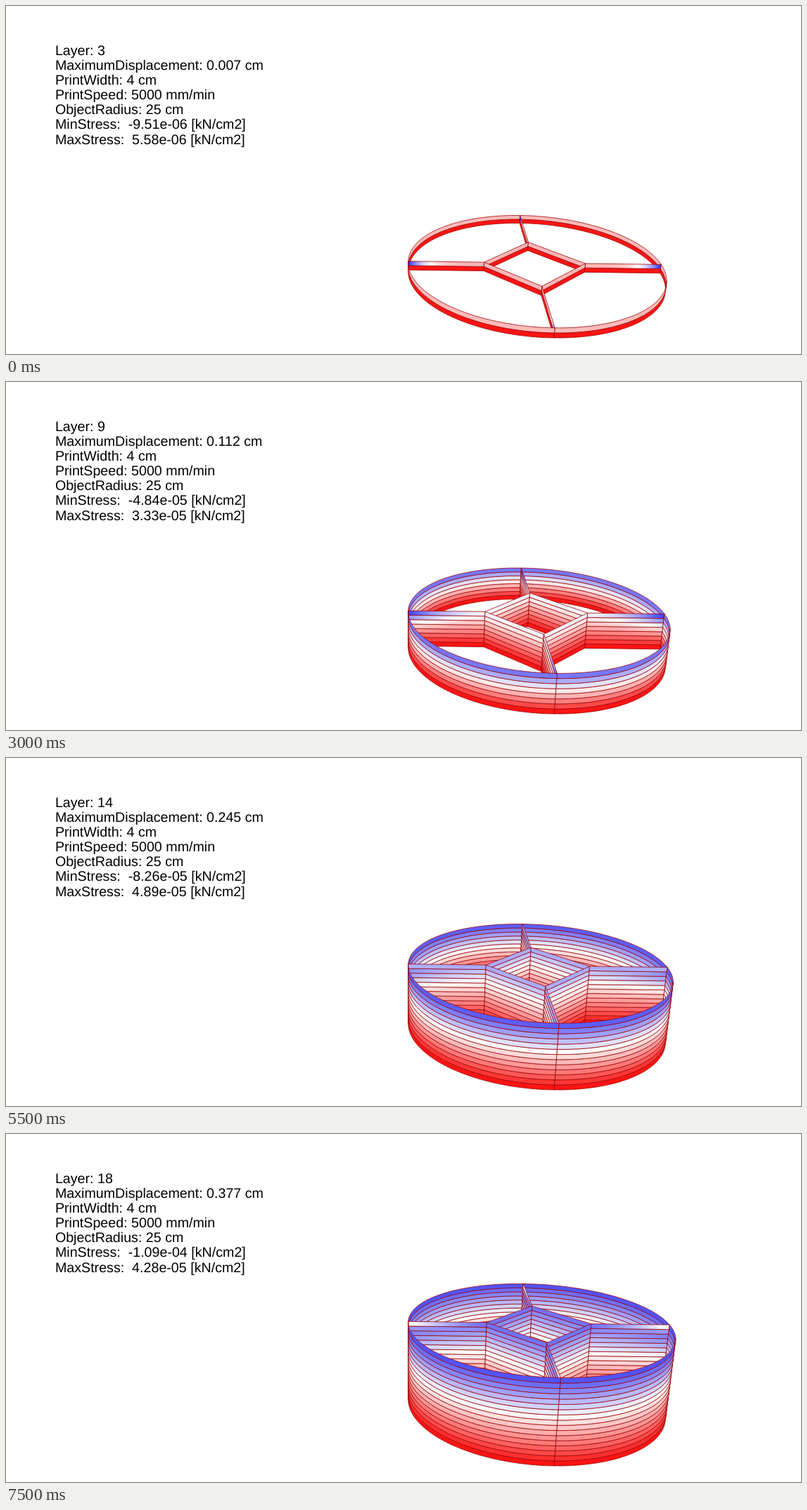
Animation, 1130 px wide and 496 px high, one loop 8000 ms. Source, as an HTML page with a canvas:

```html
<!DOCTYPE html>
<html lang="en">
<head>
<meta charset="utf-8">
<title>Layer stress</title>
<style>
  html, body { margin: 0; width: 100%; height: 100%; overflow: hidden; background: #fff; }
  canvas { display: block; }
</style>
</head>
<body>
<canvas id="stage" width="1130" height="496"></canvas>
<script>
const ctx = document.getElementById('stage').getContext('2d');
const STEP = 500, STEPS = 16, FIRST_LAYER = 3;
const INNER = 0.4;       // corner radius of the inner square, ring radius = 1
const SILHOUETTE = 16.5; // angle where the ring turns its outside to the viewer

const displacement = [7, 19, 33, 50, 68, 89, 112, 136, 162, 188, 216, 245, 276, 308, 342, 377];
const minStress = [0.951, 1.52, 2.15, 2.81, 3.48, 4.16, 4.84, 5.53, 6.21, 6.89, 7.58, 8.26, 8.94, 9.62, 10.3, 10.9];
const maxStress = [0.558, 1.03, 1.53, 2.05, 2.55, 2.95, 3.33, 3.82, 4.26, 4.58, 4.81, 4.89, 4.90, 4.79, 4.59, 4.28];

// Perspective: u runs right, v towards the viewer, z counts layers upwards.
function project([u, v], z) {
  const lift = 0.00215 * z;
  const flat = 1 - 0.156 * v;
  const w = flat - lift;
  return [
    (750.7 * flat + 179 * u + 23.9 * v - 572 * lift) / w,
    (378.5 * flat + 2.3 * u + 79.76 * v - 3249 * lift) / w
  ];
}

// -1 is blue, 0 white, 1 red.
function stressColor(value) {
  const fade = Math.round(255 * (1 - Math.min(1, Math.abs(value))));
  return value < 0 ? `rgb(${fade},${fade},255)` : `rgb(255,${fade},${fade})`;
}

const ramp = (top, depth, count) => top + (0.92 - top) * depth / (count - 1);
const ringStress = (depth, count) => ramp(-0.8 + 2.14 / count, depth, count);
const squareStress = (depth, count) => ramp(0.4 - 0.056 * count, depth, count);

// Stress along a spoke; s = 0 at the ring and 1 at the square.
function spokeStress(depth, count, s) {
  const topPeak = Math.max(-1.1, -1 + 0.145 * (count - 6));
  const buried = -0.3 * depth / 2 * Math.exp(1 - depth / 2);
  const height = (count - 1 - depth) / (count - 1);
  const peak = (topPeak * Math.exp(-depth / 1.5) + buried) * height;
  return squareStress(depth, count) + peak * (1 - s) ** (1 + 6 / count);
}

// Stacks the bands of one wall, fill(depth, z) giving each its paint.
function drawWall(path, count, fill) {
  for (let z = 0; z < count; z++) {
    const lower = path.map(p => project(p, z));
    const upper = path.map(p => project(p, z + 1)).reverse();
    ctx.beginPath();
    for (const point of [...lower, ...upper]) ctx.lineTo(...point);
    ctx.closePath();
    ctx.fillStyle = fill(count - 1 - z, z);
    ctx.fill();
    ctx.stroke();
  }
}

function drawArc(from, to, count) {
  const path = Array.from({ length: 41 }, (_, i) => {
    const angle = (from + (to - from) * i / 40) * Math.PI / 180;
    return [Math.cos(angle), Math.sin(angle)];
  });
  drawWall(path, count, depth => stressColor(ringStress(depth, count)));
}

function drawSpoke([u, v], count) {
  const ends = [[u, v], [u * INNER, v * INNER]];
  drawWall(ends, count, (depth, z) => {
    const gradient = ctx.createLinearGradient(...project(ends[0], z), ...project(ends[1], z));
    for (let s = 0; s <= 10; s++) {
      gradient.addColorStop(s / 10, stressColor(spokeStress(depth, count, s / 10)));
    }
    return gradient;
  });
}

function drawSide(a, b, count) {
  const corners = [a, b].map(([u, v]) => [u * INNER, v * INNER]);
  drawWall(corners, count, depth => stressColor(squareStress(depth, count)));
}

// Walls are painted from the farthest to the nearest.
function drawObject(count) {
  const left = [-1, 0], right = [1, 0], back = [0, -1], front = [0, 1];
  ctx.strokeStyle = '#980808';
  ctx.lineWidth = 0.8;
  ctx.lineJoin = 'round';
  drawArc(180, 270, count);
  drawArc(270, 360, count);
  drawSpoke(back, count);
  drawSide(left, back, count);
  drawSide(back, right, count);
  drawSpoke(left, count);
  drawSpoke(right, count);
  drawSide(left, front, count);
  drawSide(front, right, count);
  drawSpoke(front, count);
  drawArc(0, SILHOUETTE, count);
  drawArc(SILHOUETTE, 90, count);
  drawArc(90, 180, count);
}

function scientific(value) {
  return (value * 1e-5).toExponential(2).replace(/-(\d)$/, '-0$1');
}

function drawText(step) {
  const lines = [
    `Layer: ${FIRST_LAYER + step}`,
    `MaximumDisplacement: ${(displacement[step] / 1000).toFixed(3)} cm`,
    'PrintWidth: 4 cm',
    'PrintSpeed: 5000 mm/min',
    'ObjectRadius: 25 cm',
    `MinStress:  -${scientific(minStress[step])} [kN/cm2]`,
    `MaxStress:  ${scientific(maxStress[step])} [kN/cm2]`
  ];
  ctx.font = '19.67px "Liberation Sans", Arial, sans-serif';
  ctx.textRendering = 'geometricPrecision';
  ctx.fillStyle = '#000';
  lines.forEach((line, i) => ctx.fillText(line, 69.9, 70.2 + 21.05 * i));
}

let shown = -1;
const start = performance.now();

function frame() {
  const step = Math.floor(Math.max(0, performance.now() - start) / STEP) % STEPS;
  if (step !== shown) {
    shown = step;
    ctx.fillStyle = '#fff';
    ctx.fillRect(0, 0, 1130, 496);
    drawText(step);
    drawObject(step + FIRST_LAYER - 1);
  }
  requestAnimationFrame(frame);
}
frame();
</script>
</body>
</html>
```
